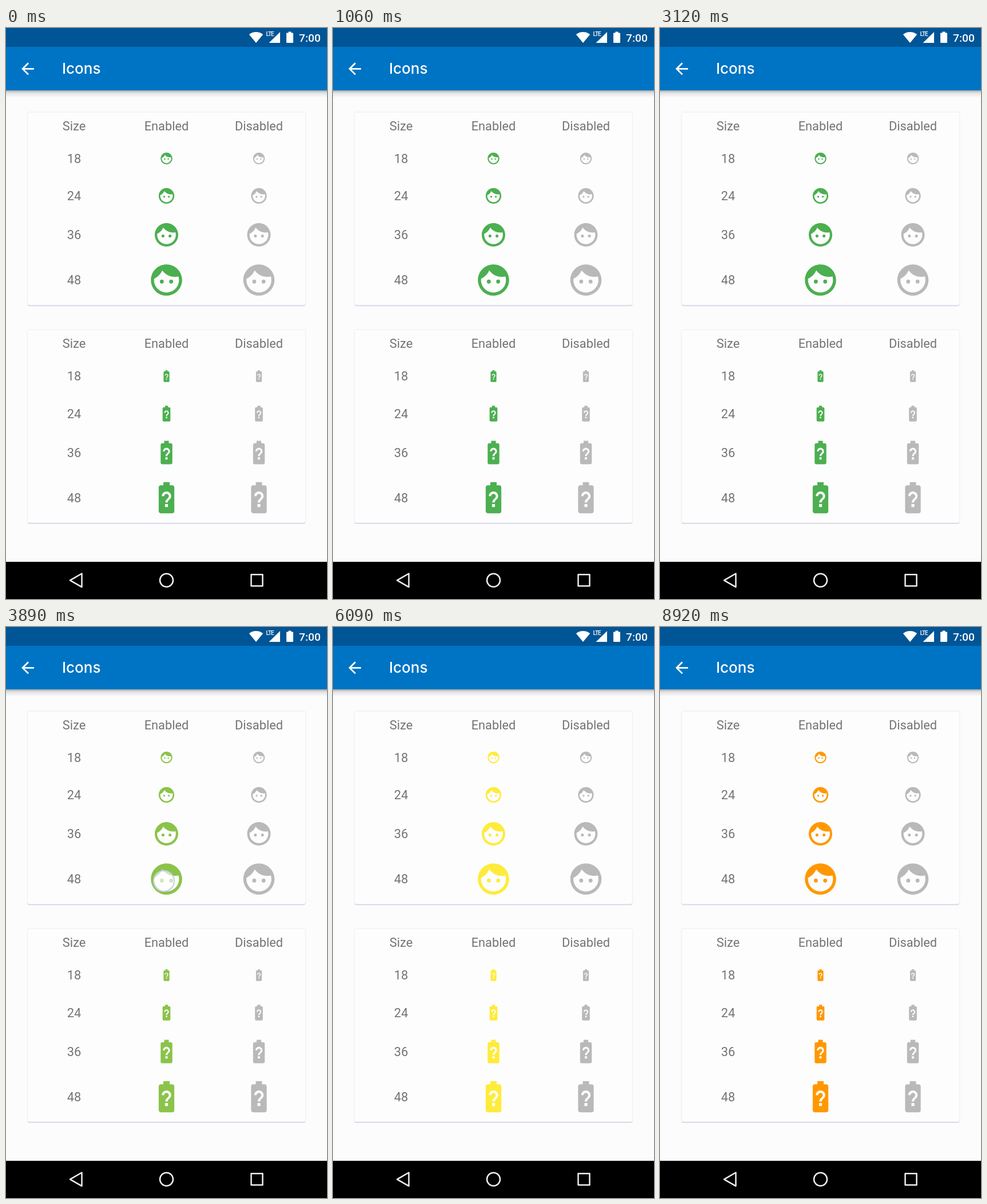
An HTML page that plays this animation: 561x998 px, repeating every 9790 ms.

```html
<!DOCTYPE html>
<html lang="en">
<head>
<meta charset="utf-8">
<title>Icons</title>
<style>
  html, body { margin: 0; width: 100%; height: 100%; overflow: hidden; background: #fcfcfc; }
  svg { display: block; width: 100vw; height: 100vh; font-family: Roboto, sans-serif; }
  .card { fill: #fdfdfd; filter: drop-shadow(0 1.4px .7px #b9b9dccc) drop-shadow(0 0 1px #d8d8e8); }
  .label { font-size: 21.8px; fill: #747474; text-anchor: middle; }
  .enabled { fill: var(--tint); }
  .disabled { fill: #b9b9b9; }
  .white { fill: #fff; }
  .nav { fill: none; stroke: #eee; stroke-width: 2.5; stroke-linejoin: round; }
</style>
</head>
<body>
<svg id="stage" viewBox="0 0 561 998">
  <defs>
    <linearGradient id="shade" x2="0" y2="1">
      <stop offset="0" stop-color="#555" stop-opacity=".5"/>
      <stop offset=".35" stop-color="#777" stop-opacity=".2"/>
      <stop offset="1" stop-color="#999" stop-opacity="0"/>
    </linearGradient>
    <path id="face" d="M9 11.75a1.25 1.25 0 1 0 0 2.5 1.25 1.25 0 1 0 0-2.5zm6 0a1.25 1.25 0 1 0 0 2.5 1.25 1.25 0 1 0 0-2.5zM12 2C6.48 2 2 6.48 2 12s4.48 10 10 10 10-4.48 10-10S17.52 2 12 2zm0 18c-4.41 0-8-3.59-8-8 0-.29.02-.58.05-.86 2.36-1.05 4.23-2.98 5.21-5.37C11.07 8.33 14.05 10 17.42 10c.78 0 1.53-.09 2.25-.26.21.71.33 1.47.33 2.26 0 4.41-3.59 8-8 8z"/>
    <path id="battery" d="M15.67 4H14V2h-4v2H8.33C7.6 4 7 4.6 7 5.33v15.33C7 21.4 7.6 22 8.33 22h7.33c.74 0 1.34-.6 1.34-1.33V5.33C17 4.6 16.4 4 15.67 4zm-2.72 13.95h-1.9v-1.9h1.9zm1.35-5.26s-.38.42-.67.71c-.48.48-.83 1.15-.83 1.6h-1.6c0-.83.46-1.52.93-2l.93-.94c.27-.27.44-.65.44-1.06 0-.83-.67-1.5-1.5-1.5s-1.5.67-1.5 1.5H9c0-1.66 1.34-3 3-3s3 1.34 3 3c0 .66-.27 1.26-.7 1.69z"/>
  </defs>

  <rect y="109" width="561" height="13" fill="url(#shade)"/>
  <rect width="561" height="109" fill="#0074c4"/>
  <rect width="561" height="33" fill="#005596"/>

  <g class="white">
    <path d="M437 26 424.8 11.3Q430 7 437 7t12.2 4.3z"/>
    <path d="M479 7v19h-19.500z"/>
    <text x="454.500" y="14" font-size="10" font-weight="500" letter-spacing="-1" stroke="#005596" stroke-width="2" paint-order="stroke">LTE</text>
    <path d="M493.500 6.500h5v2h2.500q1 0 1 1v15.500q0 1-1 1h-10q-1 0-1-1v-15.500q0-1 1-1h2.500z"/>
    <text x="512" y="24" font-size="19.2" font-weight="500">7:00</text>
    <path transform="translate(21.700 54.900) scale(1.3636)" d="M20 11H7.83l5.59-5.59L12 4l-8 8 8 8 1.41-1.41L7.83 13H20z"/>
    <text x="98" y="80" font-size="26" font-weight="500" font-family="Inter, sans-serif">Icons</text>
  </g>

  <g id="cards"></g>
  <circle id="touch" fill="#fff" fill-opacity=".6" stroke="#c8cbe8" stroke-width="2"/>

  <rect y="933" width="561" height="65"/>
  <g class="nav">
    <path d="M112 965.300 132.500 953.500v23.600z"/>
    <circle cx="280.500" cy="965.300" r="11.500"/>
    <path d="M428.500 955.300h20v20h-20z"/>
  </g>
</svg>
<script>
const LOOP = 9790;
const columns = [119, 280.5, 442];
const rows = [[18, 228], [24, 293.5], [36, 361.5], [48, 440.5]];

// [start ms, colour]
const tints = [
  [0, '#4caf50'], [3210, '#8bc34a'], [4700, '#cddc39'],
  [6000, '#ffeb3b'], [7420, '#ffc107'], [8840, '#ff9800']
];
// [down ms, up ms, x, y, radius]
const touches = [
  [1730, 1890, 273, 684, 15.5], [2730, 2860, 275, 445, 18],
  [3840, 4530, 276, 444, 18], [5200, 5710, 276, 445, 18],
  [6700, 7250, 276, 444, 18], [8130, 8540, 277, 444, 18]
];

const label = (text, x, y) =>
  `<text class="label" x="${x}" y="${y + 7.8}">${text}</text>`;

function icon(name, state, size, x, y) {
  const scale = size * 1.3636 / 24;
  return `<use href="#${name}" class="${state}" transform="translate(${x} ${y}) scale(${scale}) translate(-12 -12)"/>`;
}

function card(name, top) {
  const head = ['Size', 'Enabled', 'Disabled'].map((text, i) => label(text, columns[i], 171));
  const body = rows.map(([size, y]) =>
    label(size, columns[0], y) +
    icon(name, 'enabled', size, columns[1], y) +
    icon(name, 'disabled', size, columns[2], y));
  return `<g transform="translate(0 ${top})">
    <rect class="card" x="38" y="147.5" width="485" height="337" rx="3"/>
    ${head.join('')}${body.join('')}</g>`;
}

document.getElementById('cards').innerHTML = card('face', 0) + card('battery', 380.5);
const stage = document.getElementById('stage');
const ring = document.getElementById('touch');

function draw(now) {
  const t = now % LOOP;
  stage.style.setProperty('--tint', tints.findLast(([start]) => t >= start)[1]);
  const touch = touches.find(([down, up]) => t >= down && t < up);
  ring.style.display = touch ? '' : 'none';
  if (touch) ['cx', 'cy', 'r'].forEach((key, i) => ring.setAttribute(key, touch[i + 2]));
  requestAnimationFrame(() => draw(performance.now()));
}
draw(performance.now());
</script>
</body>
</html>
```
